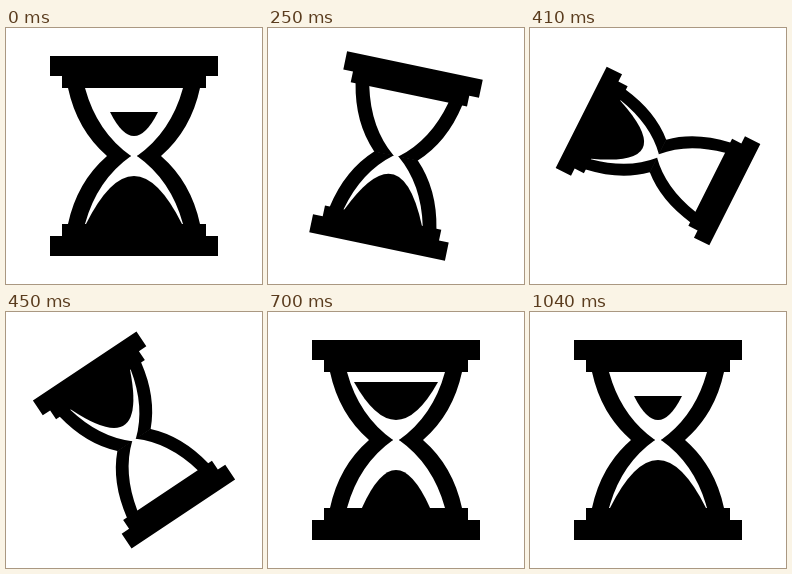
An HTML page without scripts for the animation above (1.16 s loop, 256 by 256 pixels).

```html
<!DOCTYPE html>
<html lang="en">
<head>
<meta charset="utf-8">
<title>Hourglass</title>
<style>
  html, body { margin: 0; width: 100%; height: 100%; overflow: hidden; background: #fff; }
  svg { display: block; width: 100%; height: 100%; }
  .glass, .top, .bottom { animation: 1.16s infinite; }
  .glass { transform-origin: 128px 128px; animation-name: turn; animation-timing-function: step-end; }
  .top { transform-origin: 128px 108px; animation-name: drain; }
  .bottom { transform-origin: 128px 196px; animation-name: pile; }

  /* Half turn with a squeeze; by symmetry the last steps settle to 0deg. */
  @keyframes turn {
    0%     { rotate: 0deg; scale: 1 1; }
    13.79% { rotate: 1.05deg; scale: .975 .988; }
    17.24% { rotate: 4.7deg; scale: .909 .961; }
    21.55% { rotate: 11.8deg; scale: .825 .925; }
    25%    { rotate: 23.8deg; scale: .741 .889; }
    28.44% { rotate: 42.6deg; scale: .676 .86; }
    31.89% { rotate: 76.5deg; scale: .65 .85; }
    35.34% { rotate: 116.7deg; scale: .676 .86; }
    38.79% { rotate: 146.3deg; scale: .741 .889; }
    43.1%  { rotate: 164deg; scale: .825 .925; }
    46.55% { rotate: -5.7deg; scale: .907 .957; }
    50%    { rotate: -1.4deg; scale: .975 .988; }
    53.44%, 100% { rotate: 0deg; scale: 1 1; }
  }

  /* Sand runs at 24 steps a second. */
  @keyframes drain {
    0%     { scale: .5 .5; animation-timing-function: steps(4); }
    13.79% { scale: .125 .125; animation-timing-function: step-end; }
    17.24% { scale: 0 0; animation-timing-function: step-end; }
    46.55% { scale: 1 1; animation-timing-function: step-end; }
    50%    { scale: 1 1; animation-timing-function: steps(3); }
    60.34% { scale: .875 .79; animation-timing-function: steps(8); }
    89.65%, 100% { scale: .5 .5; }
  }
  @keyframes pile {
    0%     { scale: 1 1; animation-timing-function: step-end; }
    46.55% { scale: 0 0; animation-timing-function: step-end; }
    50%    { scale: 0 0; animation-timing-function: steps(3); }
    60.34% { scale: .71 .79; animation-timing-function: steps(4); }
    75%    { scale: .89 .93; animation-timing-function: steps(4); }
    89.65%, 100% { scale: 1 1; }
  }
</style>
</head>
<body>
<svg viewBox="0 0 256 256" role="img" aria-label="Turning hourglass">
  <defs>
    <path id="wall" d="M62 59V60Q71 102 101 128V128.2H125V128Q91 104 79 60V59Z"/>
    <g id="half">
      <path d="M44 28H212V48H200V60H56V48H44Z"/>
      <use href="#wall"/>
      <use href="#wall" transform="matrix(-1 0 0 1 256 0)"/>
    </g>
  </defs>
  <g class="glass">
    <use href="#half"/>
    <use href="#half" transform="matrix(1 0 0 -1 0 256)"/>
    <path class="top" d="M80 60Q128 156 176 60Z"/>
    <path class="bottom" d="M80 196Q128 100 176 196V198H80Z"/>
  </g>
</svg>
</body>
</html>
```
